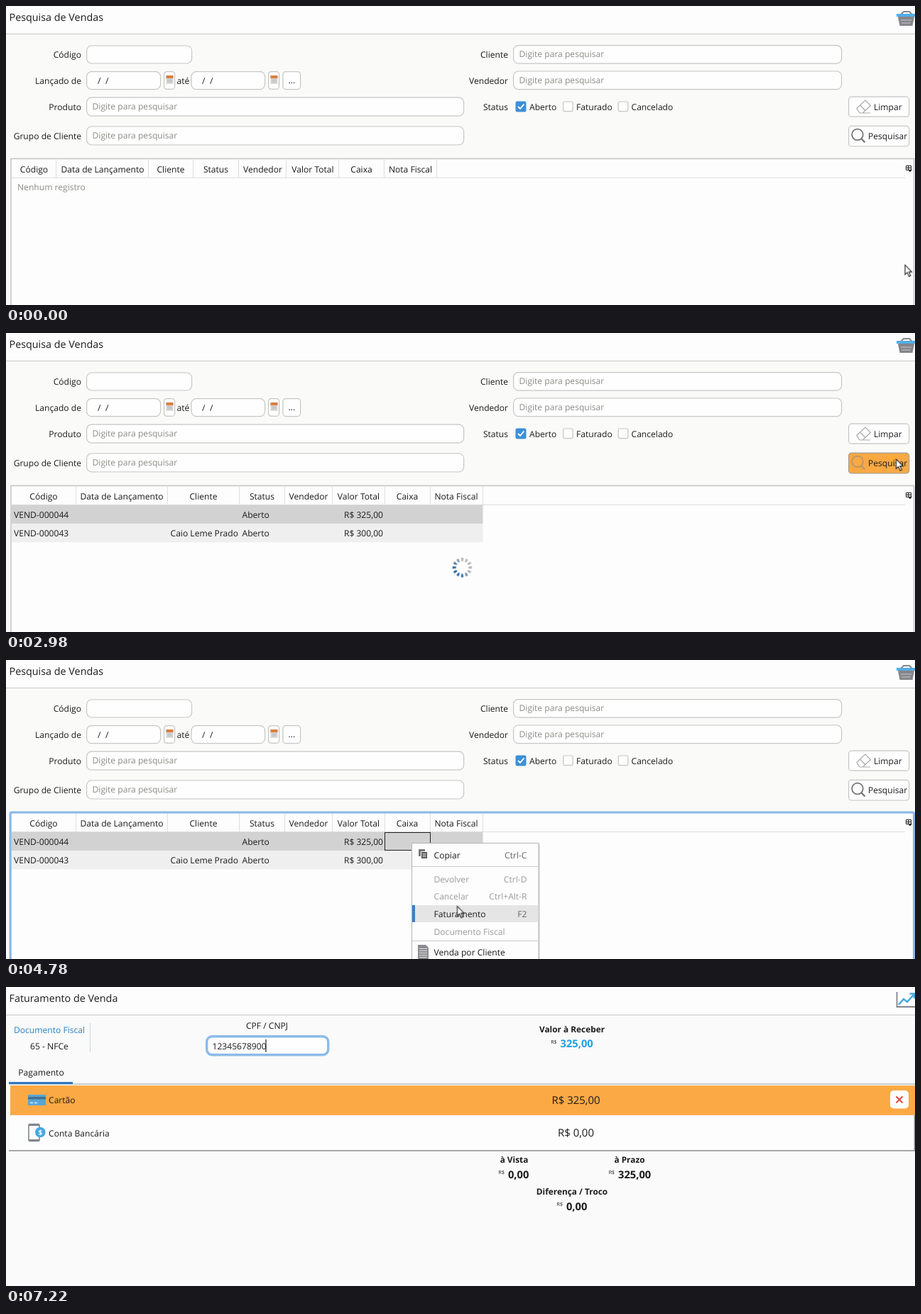
An HTML page that plays this animation: 1280x422 px, repeating every 7820 ms.

```html
<!DOCTYPE html>
<html lang="pt-BR">
<head>
<meta charset="utf-8">
<title>Pesquisa de Vendas</title>
<style>
html, body { margin: 0; width: 100%; height: 100%; overflow: hidden; background: #fdfdfd; }
svg { display: block; width: 100%; height: 100%; }
text { font: 12.1px "Open Sans", "Noto Sans", sans-serif; fill: #1b1b1b; text-rendering: geometricPrecision; }
.title { font-size: 14.35px; }
.mid text, text.mid { text-anchor: middle; }
.end text, text.end { text-anchor: end; }
.hint text, .hint { fill: #8b8b86; }
.off { fill: #9b9b9b; }
.key { fill: #666; }
.price { font-size: 14.95px; }
.bold { font-weight: 700; font-size: 11.85px; }
.sum { font-weight: 700; font-size: 14.7px; }
.cur { font-weight: 400; font-size: 7px; fill: #1b1b1b; }
.box rect { fill: #fefefe; stroke: #c6c6c6; stroke-width: 1.2; }
.line { fill: none; stroke: #c9c9c9; }
.grid { fill: none; stroke: #dedede; }

/* Scene timing: every change is a hard cut */
[class*="t-"] { animation: 7820ms step-end infinite; }
.t-empty { animation-name: empty; }
.t-filled { animation-name: filled; }
.t-hover { animation-name: hover; }
.t-press { animation-name: press; }
.t-load { animation-name: load; }
.t-spin { animation-name: spin; }
.t-select { animation-name: select; }
.t-focus { animation-name: focus; }
.t-menu { animation-name: menu; }
.t-cell { animation-name: cell; }
.t-item { animation-name: item; }
.t-head { animation-name: head; }
.t-bill { animation-name: bill; transform-origin: 640px 300px; }
.t-active { animation-name: active; }
.t-click { animation-name: click; }
.t-blank { animation-name: blank; }
.t-typed { animation-name: typed; }
.t-due { animation-name: due; }
.t-paid { animation-name: paid; }
.t-mouse { animation-name: mouse; }
@keyframes empty { 0% { opacity: 1 } 22.8900%, 100% { opacity: 0 } }
@keyframes filled { 0% { opacity: 0 } 22.8900%, 100% { opacity: 1 } }
@keyframes hover { 0% { opacity: 0 } 7.6726% { opacity: 1 } 53.4526%, 100% { opacity: 0 } }
@keyframes press { 0% { opacity: 0 } 15.2173% { opacity: 1 } 22.8900%, 100% { opacity: 0 } }
@keyframes load { 0% { opacity: 0 } 22.8900% { opacity: 1 } 45.7800%, 100% { opacity: 0 } }
@keyframes spin { 0% { transform: none } 30.4347% { transform: rotate(120deg) } 38.1074%, 100% { transform: rotate(210deg) } }
@keyframes select { 0% { opacity: 0 } 45.7800% { opacity: 1 } 53.4526%, 100% { opacity: 0 } }
@keyframes focus { 0% { opacity: 0 } 45.7800%, 100% { opacity: 1 } }
@keyframes menu { 0% { opacity: 0 } 53.4526% { opacity: 1 } 69.3094%, 100% { opacity: 0 } }
@keyframes cell { 0% { opacity: 0 } 53.4526%, 100% { opacity: 1 } }
@keyframes item { 0% { opacity: 0 } 61.1253%, 100% { opacity: 1 } }
@keyframes head { 0% { opacity: 1 } 69.3094%, 100% { opacity: 0 } }
@keyframes bill {
  0% { opacity: 0; transform: scale(.9975) }
  69.3094% { opacity: .92; transform: scale(.9975) }
  76.9820%, 100% { opacity: 1; transform: none }
}
@keyframes active { 0% { opacity: 0 } 76.9820%, 100% { opacity: 1 } }
@keyframes click { 0% { opacity: 0 } 76.9820% { opacity: 1 } 84.6547%, 100% { opacity: 0 } }
@keyframes blank { 0% { opacity: 1 } 84.6547%, 100% { opacity: 0 } }
@keyframes typed { 0% { opacity: 0 } 84.6547%, 100% { opacity: 1 } }
@keyframes due { 0% { opacity: 1 } 92.3273%, 100% { opacity: 0 } }
@keyframes paid { 0% { opacity: 0 } 92.3273%, 100% { opacity: 1 } }
@keyframes mouse {
  0% { transform: translate(1266px, 365.5px); opacity: 1 }
  7.6726% { transform: translate(1256px, 188px) }
  15.2173% { transform: translate(1253.5px, 178px) }
  53.4526% { transform: translate(571.5px, 258.5px) }
  61.1253% { transform: translate(635.5px, 347.5px) }
  69.3094% { transform: translate(637px, 361.5px); opacity: 1 }
  76.9820%, 100% { transform: translate(637px, 361.5px); opacity: 0 }
}
</style>
</head>
<body>
<svg viewBox="0 0 1280 422" preserveAspectRatio="none">
<defs>
  <linearGradient id="fade" x1=".75" y1="0" x2=".25" y2="1">
    <stop offset=".2" stop-color="#2766a3"/><stop offset=".5" stop-color="#8398ad"/><stop offset=".75" stop-color="#b4b4b4"/>
  </linearGradient>
  <g id="calendar">
    <rect x=".6" y=".6" width="15" height="24.8" rx="4" fill="#fefefe" stroke="#c6c6c6" stroke-width="1.2"/>
    <path d="M3.5 7h10v11h-10z" fill="#d9d9d9"/>
    <path d="M5 12.5h7M5 15h7" stroke="#b5b5b5"/>
    <path d="M3.5 6h10v4.2h-10z" fill="#d8813f"/>
  </g>
  <g id="lens" fill="none">
    <circle cx="1199" cy="181.5" r="7.8" stroke-width="1.8"/>
    <path d="M1204.5 187.5l5 5" stroke-width="2.4"/>
  </g>
</defs>

<rect width="1280" height="422" fill="#fdfdfd"/>
<rect y="40" width="1280" height="382" fill="#fafaf8"/>

<g class="t-head">
  <text class="title" x="4.5" y="21">Pesquisa de Vendas</text>
  <path d="M1260 12l4-4h8l4 4" fill="none" stroke="#85858c" stroke-width="1.8"/>
  <path d="M1256 15h23l-2.5 13h-18z" fill="#85858c"/>
  <path d="M1260 20h15M1261 24h13" stroke="#c9c9ce"/>
  <path d="M1254 11h26v4h-26z" fill="#55aee6"/>
</g>
<path class="line" d="M0 39.5h1280"/>

<g class="end">
  <text x="106" y="73">Código</text>
  <text x="106" y="109.5">Lançado de</text>
  <text x="106" y="146.5">Produto</text>
  <text x="106" y="187.5">Grupo de Cliente</text>
  <text x="707" y="73">Cliente</text>
  <text x="707" y="109.5">Vendedor</text>
  <text x="707" y="146.5">Status</text>
</g>
<g class="box">
  <rect x="113.6" y="56" width="148" height="25" rx="7"/>
  <rect x="113.6" y="92.6" width="104" height="25" rx="7"/>
  <rect x="261" y="92.6" width="103.6" height="25" rx="7"/>
  <rect x="390" y="92.6" width="24.6" height="25" rx="4"/>
  <rect x="113.6" y="129.2" width="531" height="26" rx="7"/>
  <rect x="113.6" y="170" width="531" height="26" rx="7"/>
  <rect x="714.6" y="55.6" width="462" height="25.6" rx="7"/>
  <rect x="714.6" y="92" width="462" height="25.6" rx="7"/>
  <rect x="784.6" y="135" width="13.6" height="13.6" rx="2"/>
  <rect x="862.2" y="135" width="13.6" height="13.6" rx="2"/>
  <rect x="1186.6" y="128.2" width="85" height="28" rx="4"/>
  <rect x="1186.6" y="169.4" width="85" height="28.6" rx="4"/>
</g>
<use href="#calendar" x="222" y="92"/>
<use href="#calendar" x="369" y="92"/>
<text x="129" y="109.5">/</text><text x="140" y="109.5">/</text>
<text x="276" y="109.5">/</text><text x="287" y="109.5">/</text>
<text x="240.5" y="109.5">até</text>
<text class="mid" x="402.3" y="108.5">...</text>
<g class="hint">
  <text x="121.5" y="146">Digite para pesquisar</text>
  <text x="121.5" y="187">Digite para pesquisar</text>
  <text x="722.5" y="72">Digite para pesquisar</text>
  <text x="722.5" y="108.5">Digite para pesquisar</text>
</g>
<rect x="717.5" y="134.5" width="15" height="15" rx="2.5" fill="#3d8fd9"/>
<path d="M721 142l3 3 5.5-6.5" fill="none" stroke="#fff" stroke-width="1.8"/>
<text x="737" y="146.5">Aberto</text>
<text x="803" y="146.5">Faturado</text>
<text x="880.5" y="146.5">Cancelado</text>

<path d="M1198 144.5l12-11.5 7.5 7.5-11 10.5h-4.500zM1202.500 140l7.500 7.500M1206 151h11" fill="none" stroke="#a9a9a9" stroke-width="1.200"/>
<text x="1222" y="146.5">Limpar</text>
<use href="#lens" stroke="#77777b"/>
<g class="t-hover">
  <rect x="1186.600" y="169.400" width="85" height="28.600" rx="4" fill="#faa942" stroke="#a9a195" stroke-width="1.200"/>
  <use href="#lens" stroke="#b5966b"/>
</g>
<rect class="t-press" x="1185.500" y="167.500" width="87.500" height="32" rx="5" fill="none" stroke="#8ab9ea" stroke-width="2.500"/>
<text x="1214" y="188">Pesquisar</text>

<rect x="7" y="215.500" width="1271.500" height="220" fill="#fdfdfd" stroke="#c3c3c3" stroke-width="1.500"/>
<path class="grid" d="M8 242.500h1258"/>
<g fill="none" stroke="#222">
  <path d="M1267.500 225.500h7v6h-7zM1267.500 228.500h7M1270.500 225.500v6"/>
  <path d="M1270 231h6l-3 3.500z" fill="#222" stroke="none"/>
</g>

<g class="t-empty">
  <path class="grid" d="M70.500 217v25M200.500 217v25M263.500 217v25M327.500 217v25M394.500 217v25M468.500 217v25M532.500 217v25M606.500 217v25"/>
  <g class="mid">
    <text x="39.500" y="234.500">Código</text>
    <text x="136" y="234.500">Data de Lançamento</text>
    <text x="232" y="234.500">Cliente</text>
    <text x="295.500" y="234.500">Status</text>
    <text x="361.500" y="234.500">Vendedor</text>
    <text x="432" y="234.500">Valor Total</text>
    <text x="500.500" y="234.500">Caixa</text>
    <text x="569.500" y="234.500">Nota Fiscal</text>
  </g>
  <text class="hint" x="16" y="260">Nenhum registro</text>
</g>

<g class="t-filled">
  <path class="grid" d="M98.500 217v25M227.500 217v25M328.500 217v25M392.500 217v25M459.500 217v25M533.500 217v25M597.500 217v25M671.500 217v25"/>
  <g class="mid">
    <text x="53" y="234.500">Código</text>
    <text x="163" y="234.500">Data de Lançamento</text>
    <text x="278" y="234.500">Cliente</text>
    <text x="360.500" y="234.500">Status</text>
    <text x="426" y="234.500">Vendedor</text>
    <text x="496.500" y="234.500">Valor Total</text>
    <text x="565" y="234.500">Caixa</text>
    <text x="634" y="234.500">Nota Fiscal</text>
  </g>
  <path d="M8 243h663.500v26h-663.500z" fill="#d2d2d2"/>
  <path d="M8 269h663.500v26.500h-663.500z" fill="#efefef"/>
  <text x="11" y="260.500">VEND-000044</text>
  <text x="332.500" y="260.500">Aberto</text>
  <text class="end" x="531" y="260.500">R$ 325,00</text>
  <text x="11" y="287">VEND-000043</text>
  <text x="231.500" y="287">Caio Leme Prado</text>
  <text x="332.500" y="287">Aberto</text>
  <text class="end" x="531" y="287">R$ 300,00</text>
</g>
<g class="t-select">
  <path d="M8 243h663.500v26h-663.500z" fill="#2275c1"/>
  <g style="filter:brightness(0) invert(1)">
    <text x="11" y="260.500">VEND-000044</text>
    <text x="332.500" y="260.500">Aberto</text>
    <text class="end" x="531" y="260.500">R$ 325,00</text>
  </g>
</g>
<rect class="t-focus" x="6" y="215" width="1272.500" height="220" rx="2" fill="none" stroke="#8ab9ea" stroke-width="3"/>
<rect class="t-cell" x="533.500" y="243.500" width="64" height="25" fill="none" stroke="#222"/>

<g transform="translate(642.500 331)">
  <g class="t-load">
    <circle class="t-spin" r="11.200" fill="none" stroke="url(#fade)" stroke-width="5" pathLength="24" stroke-dasharray="1" stroke-dashoffset=".5"/>
  </g>
</g>

<g class="t-menu">
  <rect x="573" y="260" width="179" height="180" fill="#000" opacity=".12"/>
  <rect x="571.500" y="258.500" width="178.500" height="180" fill="#fdfdfd" stroke="#b4b4b4"/>
  <g class="t-item">
    <path d="M572 346h177v24h-177z" fill="#e5e5e5"/>
    <path d="M572 346h4v24h-4z" fill="#3d80c6"/>
  </g>
  <path class="line" d="M572 291.500h177M572 396.500h177"/>
  <path d="M581 267h9v10h-9z" fill="#77777b"/>
  <path d="M584.500 270.500h9v10h-9z" fill="#55555a" stroke="#fdfdfd"/>
  <path d="M586.500 273.500h5M586.500 275.500h5M586.500 277.500h5" stroke="#ddd"/>
  <path d="M580 402h11l4 4v16h-15z" fill="#8b8b90"/>
  <path d="M582 407.500h11M582 410.500h11M582 413.500h11M582 416.500h11M582 419.500h11" stroke="#e4e4e4"/>
  <text x="602.500" y="279.500">Copiar</text>
  <text class="off" x="602.500" y="313.500">Devolver</text>
  <text class="off" x="602.500" y="338">Cancelar</text>
  <text x="602.500" y="362.500">Faturamento</text>
  <text class="off" x="602.500" y="387.500">Documento Fiscal</text>
  <text x="602.500" y="417">Venda por Cliente</text>
  <g class="end">
    <text class="key" x="733.500" y="279.500">Ctrl-C</text>
    <text class="off" x="733.500" y="313.500">Ctrl-D</text>
    <text class="off" x="733.500" y="338">Ctrl+Alt-R</text>
    <text class="key" x="733.500" y="362.500">F2</text>
  </g>
</g>

<g class="t-bill">
  <rect x="-4" y="-4" width="1288" height="44" fill="#fdfdfd"/>
  <rect x="-4" y="40" width="1288" height="390" fill="#f9faf9"/>
  <text class="title" x="4.500" y="21">Faturamento de Venda</text>
  <path d="M1254.500 7v21h26" fill="none" stroke="#85858c" stroke-width="1.800"/>
  <path d="M1257 25l7-8 5 4 9-10M1272.500 9.500l6.500 0v6.500" fill="none" stroke="#4aa8e0" stroke-width="2.600"/>
  <path class="line" d="M-4 39.500h1288"/>

  <text class="mid" x="61" y="64.500" style="fill:#2a80c2">Documento Fiscal</text>
  <text class="mid" x="61" y="87.500">65 - NFCe</text>
  <path d="M118.500 51v41" stroke="#cbd6d4"/>
  <text class="mid" x="367.500" y="58.500">CPF / CNPJ</text>
  <rect x="282.700" y="69.700" width="171" height="26" rx="7.500" fill="#fefefe" stroke="#8bbaec" stroke-width="3.400"/>
  <g class="t-blank">
    <path d="M291.500 74v18" stroke="#222" stroke-width="1.200"/>
  </g>
  <g class="t-typed">
    <text x="290.500" y="87.500">12345678900</text>
    <path class="t-paid" d="M366 74v18" stroke="#222" stroke-width="1.200"/>
  </g>
  <g class="t-click">
    <circle cx="377" cy="81.500" r="13" fill="#f7e659" opacity=".9"/>
    <path d="M376.500 75.500h2l1 1 1-1h2M379.500 76v12M376.500 88.500h2l1-1 1 1h2" fill="none" stroke="#4a4520"/>
  </g>

  <text class="mid" x="49.500" y="125">Pagamento</text>
  <path d="M4 137h1276" stroke="#b9bcbb" stroke-width="1.300"/>
  <path d="M4 134h90v3h-90z" fill="#2f78c6"/>
  <path d="M5 138h1274v93h-1274z" fill="#fdfdfd"/>
  <path class="line" d="M5 180.500h1274"/>
  <path class="t-active" d="M6 139h1274v41.500h-1274z" fill="#fba944"/>
  <path d="M4 231h1275.500v-92" fill="none" stroke="#8d8d8d" stroke-width="1.600"/>
  <path class="t-active" d="M6 139h1274v41.500h-1274z" fill="#fba944"/>

  <rect x="31" y="152" width="25" height="15" rx="1" fill="#55a6da"/>
  <path d="M31 155h25v3.500h-25z" fill="#466f8f"/>
  <path d="M34 163.500h4M40 163.500h4" stroke="#d7ecf8" stroke-width="1.500"/>
  <text x="60" y="163.500">Cartão</text>

  <rect x="32" y="193.500" width="15" height="24" rx="1.500" fill="#fdfdfd" stroke="#83868b" stroke-width="1.600"/>
  <path d="M32 194.500h15M32 216.500h15" stroke="#83868b" stroke-width="3"/>
  <circle cx="48.300" cy="205" r="7.300" fill="#46a8e4"/>
  <text class="mid" x="48.300" y="208.700" style="font-size:10px;font-weight:700;fill:#fff">$</text>
  <text x="60" y="210.500">Conta Bancária</text>

  <rect class="t-active" x="1245" y="146" width="26" height="25.500" rx="5" fill="#fdfdfd"/>
  <path d="M1253.500 154.500l9 9m0-9l-9 9" stroke="#de4a3b" stroke-width="1.900"/>

  <g class="mid">
    <text class="price" x="802.500" y="210.500">R$ 0,00</text>
    <text class="bold" x="797" y="64">Valor à Receber</text>
    <text class="sum" x="797" y="85" style="fill:#219fe5"><tspan class="cur" dy="-5.500">R$</tspan><tspan dx="5" dy="5.500">325,00</tspan></text>
    <text class="bold" x="715.500" y="248">à Vista</text>
    <text class="sum" x="715" y="269.500"><tspan class="cur" dy="-5.500">R$</tspan><tspan dx="5" dy="5.500">0,00</tspan></text>
    <text class="bold" x="878" y="248">à Prazo</text>
    <text class="bold" x="797" y="293">Diferença / Troco</text>
    <g class="t-due">
      <text class="price" x="802.500" y="164.500">R$ 0,00</text>
      <text class="sum" x="878.500" y="269.500"><tspan class="cur" dy="-5.500">R$</tspan><tspan dx="5" dy="5.500">0,00</tspan></text>
      <text class="sum" x="797" y="314.500" style="fill:#e2483f"><tspan class="cur" dy="-5.500">R$</tspan><tspan dx="5" dy="5.500">325,00</tspan></text>
    </g>
    <g class="t-paid">
      <text class="price" x="802.500" y="164.500">R$ 325,00</text>
      <text class="sum" x="878.500" y="269.500"><tspan class="cur" dy="-5.500">R$</tspan><tspan dx="5" dy="5.500">325,00</tspan></text>
      <text class="sum" x="797" y="314.500"><tspan class="cur" dy="-5.500">R$</tspan><tspan dx="5" dy="5.500">0,00</tspan></text>
    </g>
  </g>
</g>

<path class="t-mouse" d="M0 0v13.500l3.100-2.900 2.500 5.600 2.200-1-2.400-5.300h4.200z" fill="#fff" stroke="#222" stroke-width="1.100"/>
</svg>
</body>
</html>
```
